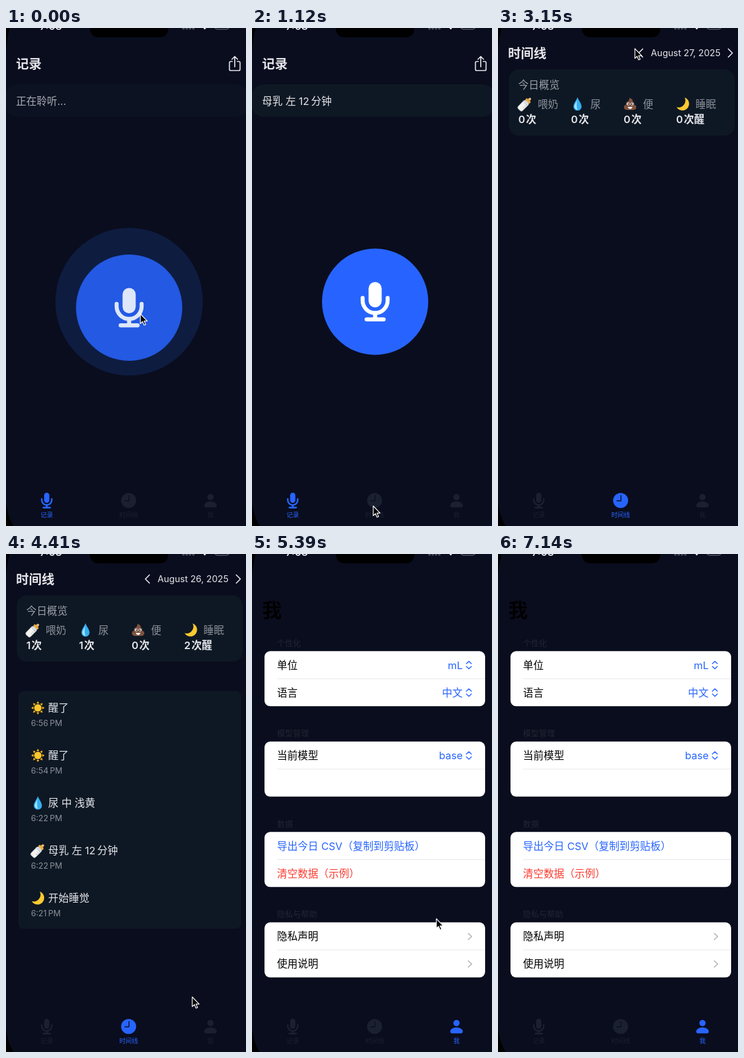
An HTML page for the animation above (7.28 s loop, 384 px wide and 796 px high).

```html
<!DOCTYPE html>
<html lang="zh-CN">
<head>
<meta charset="utf-8">
<style>
html, body { margin: 0; width: 100%; height: 100%; overflow: hidden; background: #0a0d1e; }
svg { display: block; width: 100vw; height: 100vh; }
text { font-family: Inter, "Noto Sans CJK SC", "Noto Sans CJK", sans-serif; white-space: pre; }
</style>
</head>
<body>
<svg id="stage" viewBox="0 0 384 796" preserveAspectRatio="none">
  <defs>
    <g id="mic" fill="none" stroke="currentColor" stroke-linecap="round">
      <rect x="-10.5" y="-31.5" width="21" height="40.5" rx="10.5" fill="currentColor" stroke="none"/>
      <path d="M-20 -6v4a20 20 0 0 0 40 0v-4" stroke-width="6.4"/>
      <path d="M0 19v9M-13.5 28.3h27" stroke-width="6.6"/>
    </g>
    <g id="clock">
      <circle r="12" fill="currentColor"/>
      <path d="M.5 -8v8.500h-6.500" fill="none" stroke="#0a0d1e" stroke-width="1.4" stroke-linecap="round" stroke-linejoin="round"/>
    </g>
    <g id="person" fill="currentColor">
      <circle cy="-5.500" r="5"/>
      <path d="M-10 8C-10 4-5 1.500 0 1.500S10 4 10 8Q10 11 7 11H-7Q-10 11-10 8Z"/>
    </g>
    <g id="bottle" transform="rotate(45) scale(1.12)">
      <path d="M-2.500-8Q-1.500-9-1.600-11Q0-13 1.600-11Q1.500-9 2.500-8Z" fill="#e9b873"/>
      <rect x="-4.200" y="-8" width="8.400" height="3.400" rx="1" fill="#efae3c"/>
      <rect x="-4.700" y="-4.800" width="9.400" height="16.500" rx="3" fill="#d9dde2"/>
      <path d="M-3.700 0h7.400v8q0 2.500-2.500 2.500h-2.400q-2.500 0-2.500-2.500z" fill="#f5f3ee"/>
      <path d="M1.300-1h2.300M1.300 2h2.300M1.300 5h2.300" stroke="#9aa3ad" stroke-width=".8"/>
    </g>
    <g id="drop">
      <path d="M0-11C1.500-6 6.500-1 6.500 4.300A6.500 6.300 0 0 1-6.500 4.300C-6.500-1-1.500-6 0-11Z" fill="#35aef0"/>
      <path d="M-.5-7C-3 0-5 1-4.800 5Q-3.500 9 0 9Q-2.500 3-.5-7Z" fill="#a6e4ff"/>
    </g>
    <g id="poop">
      <path d="M-1-10Q5-8 4-4Q7.500-3 6.500 1Q10.500 2 9.800 6Q9 9.500 4 9.500H-4Q-9 9.500-9.800 6Q-10.500 2-6.500 1Q-7.500-3-4-4Q-1-6-1-10Z" fill="#805340"/>
      <path d="M-5-1Q1 0 5-3M-7 3Q2 4 7 1" fill="none" stroke="#66402f"/>
      <g fill="#fff"><circle cx="-3" cy="0" r="2.300"/><circle cx="3" cy="0" r="2.300"/><path d="M-4 4.500h8Q2 8 0 8T-4 4.500Z"/></g>
      <circle cx="-2.700" cy=".2" r="1.100"/><circle cx="2.700" cy=".2" r="1.100"/>
    </g>
    <path id="moon" d="M3-10.500A10.700 10.700 0 1 1-9.800 5A11 11 0 0 0 3-10.500Z" fill="#fbc931"/>
    <g id="sun">
      <g id="rays" fill="#f9b016"></g>
      <circle r="6" fill="#fdc62d"/>
    </g>
  </defs>
  <rect width="384" height="796" fill="#0a0d1e"/>
  <g id="record"></g>
  <g id="timeline"></g>
  <g id="settings"></g>
  <g id="tabs"></g>
  <g id="frame"></g>
  <path id="cursor" d="M0 0V15.500l3.500-3.300 2.500 5.800 2.500-1.100-2.500-5.600h5Z" fill="#000" stroke="#fff" stroke-width="1.200" stroke-linejoin="round"/>
</svg>
<script>
const LOOP = 7280, STEP = 70;
const OPEN_TIMELINE = 1400, PREVIOUS_DAY = 3500, OPEN_SETTINGS = 4900, HEARD = 350;
const BLUE = '#2764ff', GREY = '#8b9099', LIGHT = '#e6e7eb', DIM = '#1b2030', CARD = '#0e1824';
const $ = id => document.getElementById(id);

// y is the vertical middle of the line
const label = (x, y, str, size = 16.5, fill = LIGHT, weight = 400, anchor = 'start') =>
  `<text x="${x}" y="${y + size * .375}" font-size="${size}" fill="${fill}" font-weight="${weight}" text-anchor="${anchor}">${str}</text>`;
const box = (x, y, w, h, r, fill) =>
  `<rect x="${x}" y="${y}" width="${w}" height="${h}" rx="${r}" fill="${fill}"/>`;
const line = (d, color, width = 1.7) =>
  `<path d="${d}" fill="none" stroke="${color}" stroke-width="${width}" stroke-linecap="round" stroke-linejoin="round"/>`;
const icon = (name, x, y, scale = 1) =>
  `<use href="#${name}" transform="translate(${x} ${y}) scale(${scale})"/>`;

$('rays').innerHTML = Array.from({ length: 8 }, (_, i) =>
  `<path d="M-2.200-7L0-10.800L2.200-7Z" transform="rotate(${i * 45})"/>`).join('');

const FEEDING = '母乳 左 12\u2009分钟';

$('record').innerHTML =
  label(16, 57, '记录', 20.5, LIGHT, 700) +
  line('M362 53.500h-2.500q-2 0-2 2v10.500q0 2 2 2h13q2 0 2-2v-10.500q0-2-2-2h-2.500M366 62v-16M361.500 50l4.500-4.500 4.500 4.500', LIGHT) +
  `<g id="speechCard">${box(-2, 90, 392, 52, 22, CARD)}</g>
   <g id="listening">${label(16, 116.5, '正在聆听...', 16.5, '#a9acb4')}</g>
   <g id="heard">${label(16, 116.5, FEEDING)}</g>
   <circle id="halo" cx="197" cy="437.500" fill="#0e1c40"/>
   <g id="button"><circle r="85" fill="${BLUE}"/><g color="#fff">${icon('mic', 0, 0)}</g></g>`;

const overview = [['bottle', '喂奶'], ['drop', '尿'], ['poop', '便'], ['moon', '睡眠']];
const entries = [
  ['sun', '醒了', '6:56'], ['sun', '醒了', '6:54'], ['drop', '尿 中 浅黄', '6:22'],
  ['bottle', FEEDING, '6:22'], ['moon', '开始睡觉', '6:21']
];
const columnX = i => 32.5 + i * 84.2;

function dayView(id, date, chevronX, counts) {
  return `<g id="${id}">` + label(356, 40, date, 14.5, LIGHT, 400, 'end') +
    line(`M${chevronX + 7} 33.500l-6.500 6.500 6.500 6.500`, LIGHT) +
    counts.map((n, i) =>
      label(columnX(i), 146, `${n}\u200a次${i === 3 ? '醒' : ''}`, 16.5, LIGHT, 600)).join('') + '</g>';
}

$('timeline').innerHTML =
  label(16, 40, '时间线', 20.5, LIGHT, 700) +
  line('M368.500 33.500l6.500 6.500-6.500 6.500', LIGHT) +
  box(17.5, 66, 361, 106, 16, CARD) +
  label(32.5, 91, '今日概览', 16.5, '#9da1a9', 500) +
  overview.map(([name, str], i) =>
    icon(name, columnX(i) + 10.5, 121.5) + label(columnX(i) + 31, 121.5, str, 16.5, GREY)).join('') +
  dayView('today', 'August 27, 2025', 224.5, [0, 0, 0, 0]) +
  dayView('yesterday', 'August 26, 2025', 222.5, [1, 1, 0, 2]) +
  '<g id="entries">' + box(20, 219, 356, 380, 8, CARD) +
  entries.map(([name, str, time], i) => {
    const y = 246 + i * 76;
    return icon(name, 51, y) + label(67.5, y, str) + label(40, y + 24, time + '\u2009PM', 13, GREY);
  }).join('') + '</g>';

const sections = [
  ['个性化', ['单位', 'mL'], ['语言', '中文']],
  ['模型管理', ['当前模型', 'base'], ['']],
  ['数据', ['导出今日 CSV（复制到剪贴板）', '', BLUE], ['清空数据（示例）', '', '#fb3b30']],
  ['隐私与帮助', ['隐私声明', '>'], ['使用说明', '>']]
];

function settingRow([title, value, color = '#000'], y) {
  let out = label(40, y, title, 16.5, color);
  if (value === '>') out += line(`M346 ${y - 5}l5.500 5-5.500 5`, '#b9b9be', 1.6);
  else if (value) out += label(337, y, value, 16.5, BLUE, 400, 'end') +
    line(`M343 ${y - 2.5}l4-3.700 4 3.700M343 ${y + 2}l4 3.700 4-3.700`, BLUE, 1.5);
  return out;
}

$('settings').innerHTML = label(16.5, 89, '我', 31, '#000', 700) +
  sections.map(([title, ...rows], i) => {
    const y = 155.3 + i * 144.5;
    return label(40, y - 13.5, title, 12.8, '#222631') +
      box(20, y, 353, 88, 9, '#fff') +
      box(40, y + 43.7, 333, .7, 0, '#dfdfe2') +
      rows.map((row, j) => settingRow(row, y + 22.5 + j * 44)).join('');
  }).join('');

$('tabs').innerHTML = [['mic', '记录', .4], ['clock', '时间线', 1], ['person', '我', 1]].map(([name, str, scale], i) =>
  `<g class="tab">${icon(name, 65.2 + i * 131, 755.3, scale)}${label(65.2 + i * 131, 778, str, 10, 'currentColor', 500, 'middle')}</g>`).join('');
const tabs = document.querySelectorAll('.tab');

$('frame').innerHTML =
  '<path d="M0 0H6Q1 16 0 42ZM0 758Q3 782 12 796H0Z"/>' +
  '<path d="M134 0H260Q259 15 245 15H149Q135 15 134 0Z"/>' +
  label(54, -3.5, '7:08', 16.5, LIGHT, 600) +
  [0, 1, 2, 3].map(i => box(282 + i * 5.3, -3, 3.8, 5.5, 1, '#4b4e5a')).join('') +
  '<path d="M313-3h10l-5 5.500z" fill="#fff"/>' +
  '<rect x="334" y="-10" width="23" height="12" rx="4" fill="none" stroke="#777a84"/>';

// time, x, y
const cursorPath = [
  [0, 215, 457], [210, 215, 457], [1120, 194, 764], [1400, 194, 764], [1750, 203, 762], [2380, 203, 762],
  [3150, 219, 33], [3500, 219, 33], [4410, 298, 708], [4690, 324, 755], [4900, 324, 755],
  [5390, 295, 583], [5670, 292, 575], [5950, 292, 575], [6160, 400, 560], [LOOP, 400, 560]
];
const mix = (a, b, p) => a + (b - a) * p;
const progress = (t, start, end) => Math.min(1, Math.max(0, (t - start) / (end - start)));
const easeInOut = p => p * p * (3 - 2 * p);
const easeOut = p => 1 - (1 - p) ** 3;
const show = (id, on) => { $(id).style.display = on ? '' : 'none'; };

function cursorAt(t) {
  const i = cursorPath.findIndex(key => key[0] > t);
  const [t0, x0, y0] = cursorPath[i - 1], [t1, x1, y1] = cursorPath[i];
  const p = easeInOut(progress(t, t0, t1));
  return [mix(x0, x1, p), mix(y0, y1, p)];
}

function render(t) {
  const screen = t < OPEN_TIMELINE ? 0 : t < OPEN_SETTINGS ? 1 : 2;
  ['record', 'timeline', 'settings'].forEach((id, i) => show(id, i === screen));
  tabs.forEach((tab, i) => tab.setAttribute('color', i === screen ? BLUE : DIM));

  const release = easeOut(progress(t, 0, 420));
  $('button').setAttribute('transform', `translate(197 ${mix(447, 437.5, release)})`);
  for (const part of $('button').children) part.setAttribute('opacity', mix(.85, 1, release));
  $('halo').setAttribute('r', mix(118, 85, release));
  $('halo').setAttribute('opacity', 1 - release);
  $('speechCard').setAttribute('opacity', t < HEARD ? .5 : 1);
  show('listening', t < HEARD);
  show('heard', t >= HEARD);

  const past = t >= PREVIOUS_DAY;
  show('today', !past);
  show('yesterday', past);
  show('entries', past);

  $('cursor').setAttribute('transform', `translate(${cursorAt(t)})`);
}

const start = performance.now();
function tick() {
  const t = (performance.now() - start) % LOOP;
  render(Math.floor(t / STEP) * STEP);
  requestAnimationFrame(tick);
}
tick();
</script>
</body>
</html>
```
